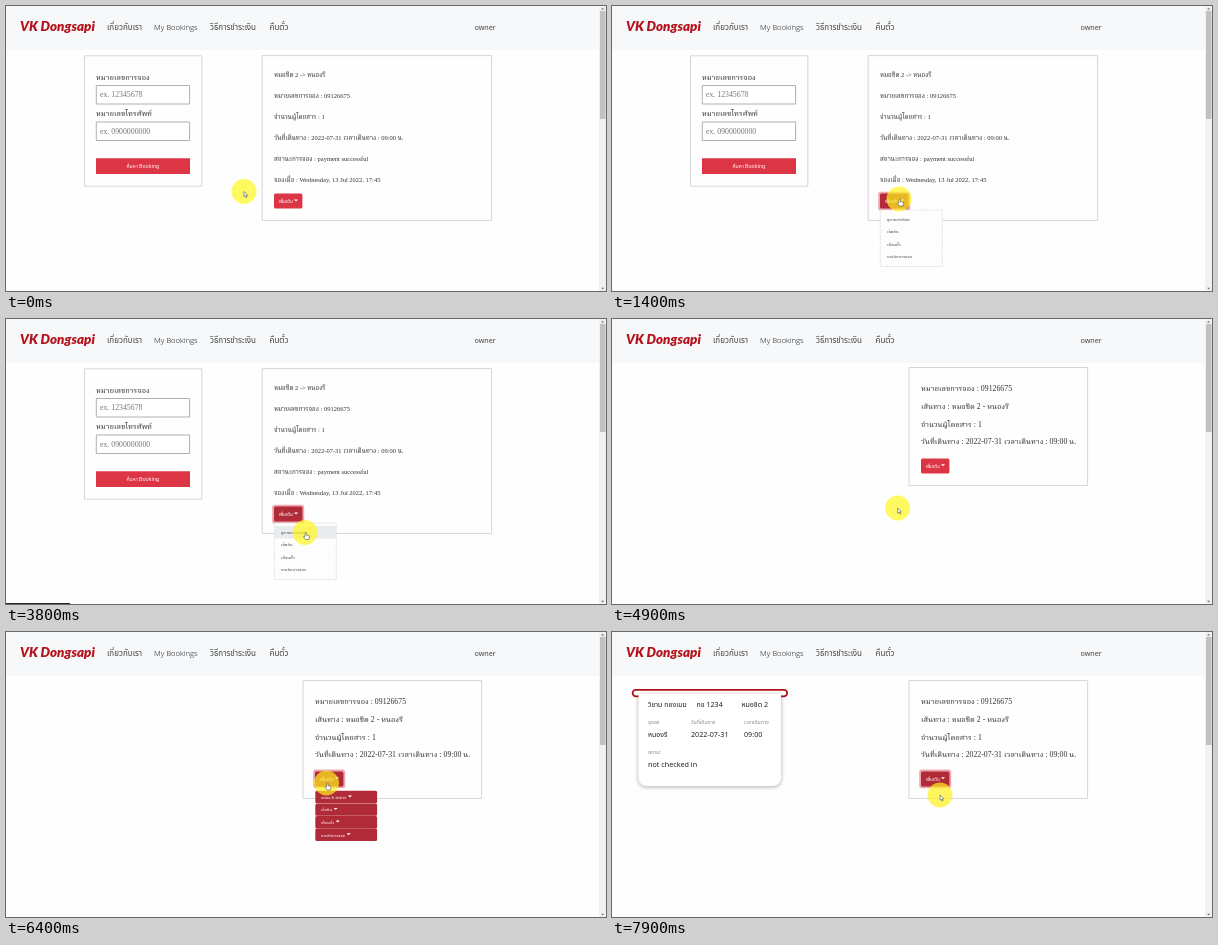
An HTML page with a canvas that plays this animation: 600x285 px, repeating every 8000 ms.

```html
<!DOCTYPE html>
<html lang="th">
<head>
<meta charset="utf-8">
<title>Booking</title>
<style>
html, body { margin: 0; width: 100%; height: 100%; overflow: hidden; background: #fefefe; }
canvas { display: block; width: 600px; height: 285px; }
</style>
</head>
<body>
<canvas id="stage"></canvas>
<script>
const W = 600, H = 285, LOOP = 8000, STEP = 50;
const canvas = document.getElementById('stage');
const ctx = canvas.getContext('2d');
const ratio = Math.max(1, window.devicePixelRatio || 1);
canvas.width = W * ratio;
canvas.height = H * ratio;

const SERIF = { latin: '"Liberation Serif", serif', thai: '"Noto Serif Thai", "Noto Serif", serif', scale: 0.97 };
const SANS = { latin: '"Noto Sans", sans-serif', thai: '"Noto Sans Thai", "Noto Sans", sans-serif', scale: 0.97 };
const LIGHT = { latin: '"Open Sans", sans-serif', thai: '"Noto Sans Thai Looped", "Noto Sans Thai", "Noto Sans", sans-serif', scale: 1.06 };
const RED = '#dc3545', DARK = '#b02a37', BRAND = '#b5121b', INK = '#333';

// Pointer moves: start, end, x, y at the end
const START = [238, 185.5];
const MOVES = [
  [0, 700, 287, 193], [2500, 2650, 299, 213.5], [4450, 4500, 293, 211],
  [4650, 4700, 270, 196], [4850, 4900, 285.7, 189], [4900, 5050, 297, 182],
  [5150, 5500, 317, 156], [5650, 5800, 320.5, 151], [7200, 7450, 328, 163]
];
const CLICKS = [850, 3850, 6100, 7600];

const clamp = v => Math.max(0, Math.min(1, v));
const ramp = (t, a, b) => clamp((t - a) / (b - a));
const ease = p => p * p * (3 - 2 * p);

function fill(x, y, w, h, color, r = 0) {
  ctx.fillStyle = color;
  ctx.beginPath();
  ctx.roundRect(x, y, w, h, r);
  ctx.fill();
}

function frame(x, y, w, h, color, dash = [], r = 0, line = 1) {
  ctx.save();
  ctx.strokeStyle = color;
  ctx.lineWidth = line;
  ctx.setLineDash(dash);
  ctx.beginPath();
  ctx.roundRect(x, y, w, h, r);
  ctx.stroke();
  ctx.restore();
}

// Writes mixed Thai and Latin text and returns its right end
function write(text, x, y, size, face = SERIF, color = INK, weight = 400) {
  ctx.fillStyle = color;
  for (const run of text.match(/[\u0E00-\u0E7F]+|[^\u0E00-\u0E7F]+/g)) {
    const thai = /[\u0E00-\u0E7F]/.test(run);
    ctx.font = `${weight} ${thai ? size * face.scale : size}px ${thai ? face.thai : face.latin}`;
    ctx.fillText(run, x, y);
    x += ctx.measureText(run).width;
  }
  return x;
}

function caret(x, y) {
  ctx.fillStyle = '#fff';
  ctx.beginPath();
  ctx.moveTo(x, y);
  ctx.lineTo(x + 4, y);
  ctx.lineTo(x + 2, y + 2);
  ctx.fill();
}

function card(x, y, w, h) {
  fill(x, y, w, h, '#fefefe');
  frame(x, y, w, h, '#d0d2d4', [], 0, 0.9);
}

function shell() {
  fill(0, 0, W, H, '#fefefe');
  fill(0, 0, 593, 44, '#f6f8fa');
  ctx.font = 'italic 900 13.4px Lato, sans-serif';
  ctx.fillStyle = BRAND;
  ctx.fillText('VK Dongsapi', 14, 24.5);
  write('เกี่ยวกับเรา', 101, 23.5, 7.6, LIGHT, '#444', 300);
  write('My Bookings', 148, 23.5, 7.7, LIGHT, '#111', 300);
  write('วิธีการชำระเงิน', 204, 23.5, 7.6, LIGHT, '#444', 300);
  write('คืนตั๋ว', 263.5, 23.5, 7.6, LIGHT, '#444', 300);
  write('owner', 468.5, 24, 7.2, SANS, '#444');

  fill(593, 0, 7, H, '#f1f1f1');
  fill(594, 5, 5.5, 108, '#c1c1c1');
  ctx.fillStyle = '#777';
  for (const [y, d] of [[3.4, -1.6], [281.8, 1.6]]) {
    ctx.beginPath();
    ctx.moveTo(595, y);
    ctx.lineTo(598.2, y);
    ctx.lineTo(596.6, y + d);
    ctx.fill();
  }
}

function moreButton(x, y, dark, ring) {
  if (ring > 0) fill(x - 1.8, y - 1.8, 32, 18.6, `rgba(225,83,97,${0.5 * ring})`, 2.5);
  fill(x, y, 28.4, 15, dark ? DARK : RED, 1.5);
  write('เพิ่มเติม', x + 5, y + 9.2, 4.6, SANS, '#fff', 500);
  caret(x + 20, y + 5.8);
}

function searchPage(t) {
  card(78.5, 49.8, 117.3, 130.4);
  const fields = [['หมายเลขการจอง', 'ex. 12345678', 73.5], ['หมายเลขโทรศัพท์', 'ex. 0900000000', 110]];
  for (const [label, hint, y] of fields) {
    write(label, 90, y, 7.8);
    fill(90.3, y + 6, 93.3, 18.5, '#fff');
    frame(90.3, y + 6, 93.3, 18.5, '#a8a8a8', [], 0, 0.9);
    write(hint, 94, y + 17.8, 7.8, SERIF, '#777');
  }
  fill(90, 152.3, 94, 15.7, RED);
  write('ค้นหา Booking', 120.5, 161.8, 5.2, SANS, '#fff');

  card(256.2, 49.6, 229.4, 164.8);
  const lines = [
    'หมอชิต 2 -> หนองรี',
    'หมายเลขการจอง : 09126675',
    'จำนวนผู้โดยสาร : 1',
    'วันที่เดินทาง : 2022-07-31 เวลาเดินทาง : 09:00 น.',
    'สถานะการจอง : payment successful',
    'จองเมื่อ : Wednesday, 13 Jul 2022, 17:45'
  ];
  lines.forEach((s, i) => write(s, 268, 71.3 + i * 20.9, 6.5));
  moreButton(268, 187.6, t >= 600, ramp(t, 850, 1050));

  const show = ramp(t, 950, 1150);
  if (!show) return;
  ctx.globalAlpha = show;
  fill(268.3, 204, 62, 56.5, '#fdfdfd');
  frame(268.3, 204, 62, 56.5, '#d2d2d2', [1, 0.8], 0, 0.8);
  if (t >= 2600) fill(268.7, 207, 61.2, 12.5, '#e9ecef');
  ['ดูรายละเอียด', 'เช็คอิน', 'เลื่อนตั๋ว', 'ยกเลิกการจอง']
    .forEach((s, i) => write(s, 275, 214.8 + i * 12.5, 4.3));
  ctx.globalAlpha = 1;
}

function detailPage(t) {
  card(297, 48.5, 178.6, 118);
  const lines = [
    'หมายเลขการจอง : 09126675',
    'เส้นทาง : หมอชิต 2 - หนองรี',
    'จำนวนผู้โดยสาร : 1',
    'วันที่เดินทาง : 2022-07-31 เวลาเดินทาง : 09:00 น.'
  ];
  lines.forEach((s, i) => write(s, 309, 72.3 + i * 17.6, 7.8));
  moreButton(309, 139.4, t >= 5700, ramp(t, 6100, 6250));

  const show = ramp(t, 6150, 6300) * (1 - ramp(t, 7600, 7700));
  if (!show) return;
  ctx.globalAlpha = show;
  fill(309, 156.5, 62.5, 54, '#fff', 2);
  ['แสดง E-ticket', 'เช็คอิน', 'เลื่อนตั๋ว', 'ยกเลิกการจอง'].forEach((s, i) => {
    const y = 158.8 + i * 12.6;
    fill(309.3, y, 61.8, 12.4, DARK, 1.5);
    caret(write(s, 315, y + 8, 4.3, SANS, '#fff', 500) + 1.6, y + 4.6);
  });
  ctx.globalAlpha = 1;
}

function ticket(show) {
  ctx.globalAlpha = show;
  frame(20.6, 57.8, 154.6, 6.6, BRAND, [], 3.3, 1.8);
  ctx.save();
  ctx.shadowColor = 'rgba(0,0,0,.32)';
  ctx.shadowBlur = 4 * ratio;
  ctx.shadowOffsetY = ratio;
  fill(26.5, 62, 142.5, 92, '#fff', [0, 0, 8, 8]);
  ctx.restore();
  const values = [
    ['วิชาน ทองเมฆ', 36, 74.8], ['กข 1234', 84.5, 74.8], ['หมอชิต 2', 129.5, 74.8],
    ['หนองรี', 36, 104.8], ['2022-07-31', 79, 104.8], ['09:00', 132, 104.8],
    ['not checked in', 36, 135]
  ];
  const labels = [['จุดลง', 36, 91.5], ['วันที่เดินทาง', 79, 91.5], ['เวลาเดินทาง', 132, 91.5], ['สถานะ', 36, 121.5]];
  for (const [s, x, y] of values) write(s, x, y, 7.2, SANS, '#222', 500);
  for (const [s, x, y] of labels) write(s, x, y, 5.3, SANS, '#8a8a8a', 500);
  ctx.globalAlpha = 1;
}

function pointer(t) {
  let [x, y] = START;
  for (const [a, b, nx, ny] of MOVES) {
    const p = ease(ramp(t, a, b));
    x += (nx - x) * p;
    y += (ny - y) * p;
  }
  const press = Math.max(0, ...CLICKS.map(c => t >= c ? 1 - ramp(t, c, c + 350) : 0));
  ctx.fillStyle = `rgba(255,${247 - 45 * press},30,.7)`;
  ctx.beginPath();
  ctx.arc(x, y, 12.5, 0, 7);
  ctx.fill();

  const hand = (t >= 600 && t < 4000) || (t >= 5700 && t < 7700);
  const shape = new Path2D(hand
    ? 'M0 .2Q.8-.6 1.4.2V2.6L4 3.2Q4.6 3.4 4.5 4.2L3.9 7H.5L-1.6 4.2Q-1.4 3.2 0 4Z'
    : 'M0 0V5.2L1.3 4.2 2.2 6.1 3 5.7 2.2 3.9H3.7Z');
  ctx.save();
  ctx.translate(x, y);
  ctx.fillStyle = '#fff';
  ctx.strokeStyle = '#444';
  ctx.lineWidth = 0.55;
  ctx.lineJoin = 'round';
  ctx.fill(shape);
  ctx.stroke(shape);
  ctx.restore();
}

function draw(t) {
  ctx.setTransform(ratio, 0, 0, ratio, 0, 0);
  shell();
  if (t < 3950) searchPage(t);
  else if (t >= 4050) detailPage(t);
  const show = ramp(t, 7650, 7800);
  if (show) ticket(show);
  const status = ramp(t, 2750, 2850) * (1 - ramp(t, 4150, 4350))
    + ramp(t, 7400, 7450) * (1 - ramp(t, 7800, 7900));
  if (status) fill(0, 284, 64, 1, `rgba(40,40,40,${status})`);
  pointer(t);
}

const begin = performance.now();
function tick(now) {
  const t = Math.max(0, now - begin) % LOOP;
  draw(Math.floor(t / STEP) * STEP);
  requestAnimationFrame(tick);
}
draw(0);
requestAnimationFrame(tick);
</script>
</body>
</html>
```
